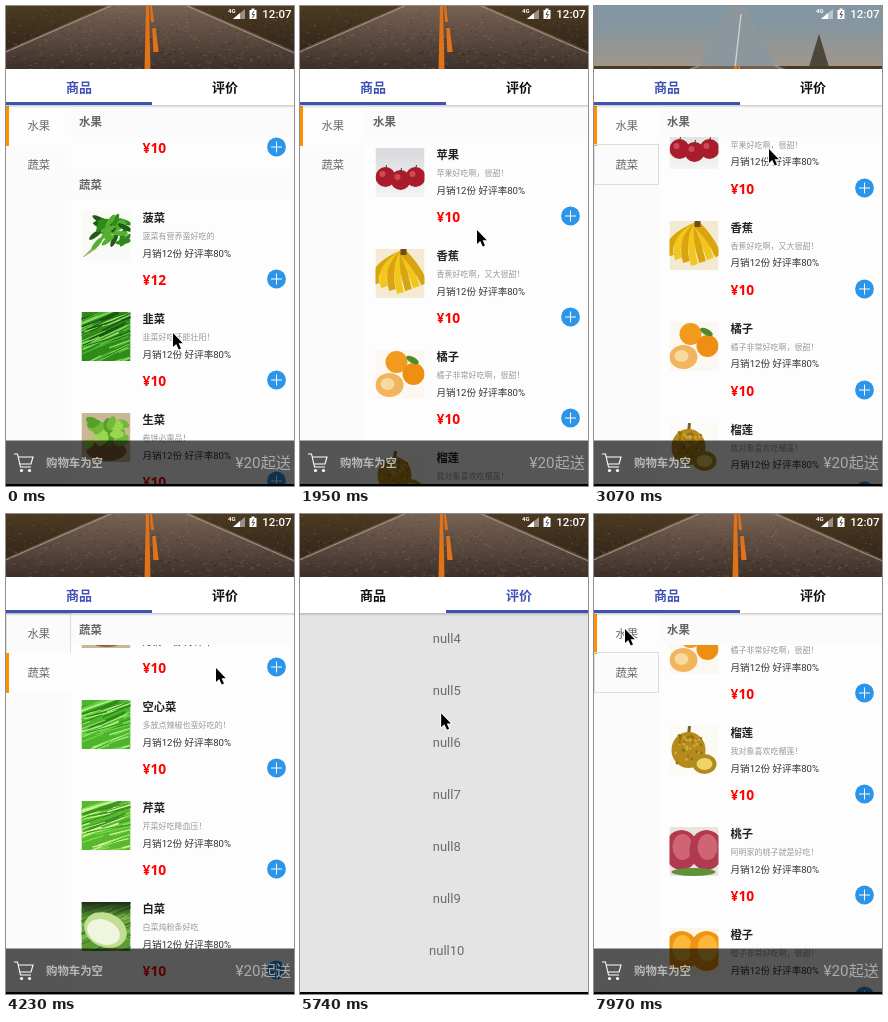
An HTML page with a canvas that plays this animation: 288 by 480 pixels, repeating every 8 s.

```html
<!DOCTYPE html>
<html lang="zh">
<head>
<meta charset="utf-8">
<style>
html, body { margin: 0; width: 100%; height: 100%; overflow: hidden; background: #000; }
canvas { display: block; }
</style>
</head>
<body>
<canvas id="stage" width="288" height="480"></canvas>
<script>
const c = document.getElementById('stage').getContext('2d');
const CJK = '"Noto Sans CJK SC", "Noto Sans CJK", sans-serif';
const LOOP = 8000, PAGE = 292, ROW = 101, HEAD = 31, TOP = 100, BOTTOM = 478;
const BLUE = '#3f51b5';

// Key points [time, value, ...], eased in between
const SCROLL = [[30, 574], [800, 215], [860, 215], [1500, 0], [2940, 0], [3070, 28], [4170, 896]];
const EXPAND = [[1960, 0], [2470, 130], [2560, 130], [2930, 0]];
const SWIPE = [[4230, 292], [5205, 0], [6490, 0], [7012, 292]];
const REVIEWS = [[5230, 0], [5860, 230], [5920, 230], [6300, 0]];
const CURSOR = [[0, 167, 327], [800, 170, 400], [1400, 177, 224], [1950, 177, 224], [2470, 176, 310],
  [3070, 175, 143], [3400, 195, 320], [4230, 210, 154], [5170, 38, 190], [5860, 150, 200],
  [6490, 227, 206], [6700, 270, 206], [7560, 31, 115]];

function at(keys, t) {
  const i = keys.findIndex(k => k[0] > t);
  if (i <= 0) return keys.at(i).slice(1);
  const a = keys[i - 1], b = keys[i], u = (t - a[0]) / (b[0] - a[0]);
  return a.slice(1).map((v, n) => v + (b[n + 1] - v) * u * u * (3 - 2 * u));
}

function rand(n) {
  const v = Math.sin(n * 12.9898) * 43758.5453;
  return v - Math.floor(v);
}

function box(color, x, y, w, h) {
  c.fillStyle = color;
  c.fillRect(x, y, w, h);
}

function oval(color, x, y, rx, ry = rx, turn = 0) {
  c.fillStyle = color;
  c.beginPath();
  c.ellipse(x, y, rx, ry, turn, 0, 7);
  c.fill();
}

function trace(p) {
  c.beginPath();
  for (let i = 0; i < p.length; i += 2) c.lineTo(p[i], p[i + 1]);
}

function poly(color, ...p) {
  trace(p);
  c.fillStyle = color;
  c.fill();
}

function line(color, width, ...p) {
  trace(p);
  c.strokeStyle = color;
  c.lineWidth = width;
  c.stroke();
}

function text(s, x, y, size, color, weight = 400, align = 'left', face = 'Roboto') {
  c.font = `${weight} ${size}px "${face}", ${CJK}`;
  c.fillStyle = color;
  c.textAlign = align;
  c.fillText(s, x, y);
}

function fade(y0, y1, ...colors) {
  const g = c.createLinearGradient(0, y0, 0, y1);
  colors.forEach((k, i) => g.addColorStop(i / (colors.length - 1), k));
  return g;
}

function clipped(x, y, w, h, draw) {
  c.save();
  c.beginPath();
  c.rect(x, y, w, h);
  c.clip();
  draw();
  c.restore();
}

// Pictures, each 49 by 49
const paper = color => box(color, 0, 0, 49, 49);

function stalks(back, colors, tilt) {
  paper(back);
  for (let i = 0; i < 60; i++) {
    const x = rand(i + 1) * 70 - 10, y = rand(i + 60) * 52;
    line(colors[i % colors.length], 0.8 + rand(i + 9), x - 18, y + tilt, x + 18, y - tilt + rand(i) * 10);
  }
}

function leaves(colors, count, x, y, w, h, rx, ry) {
  for (let i = 0; i < count; i++)
    oval(colors[i % colors.length], x + rand(i + 1) * w, y + rand(i + 40) * h, rx, ry, rand(i + 7) * 2 - 1.5);
}

function pair(back, dark, light) {
  paper(back);
  for (const x of [12, 37]) {
    oval(dark, x, 23, 17, 20);
    oval(light, x + 1, 20, 10, 13);
  }
}

function apples() {
  paper(fade(0, 49, '#d8d9dc', '#f4f4f5'));
  for (let i = 0; i < 3; i++) {
    const x = 10 + i * 15, y = 29 + i % 2 * 3;
    oval('#a81c2c', x, y, 10);
    oval('#cf4a55', x - 3, y - 3, 3);
    line('#5a3a22', 1, x, y - 7, x + 1, y - 12);
  }
}

function bananas() {
  paper('#f3ead2');
  for (let i = 0; i < 7; i++) {
    c.lineWidth = 7;
    c.strokeStyle = i % 2 ? '#f2c61c' : '#d9a40f';
    c.beginPath();
    c.moveTo(28, 4);
    c.quadraticCurveTo(i * 8 - 6, 18, i * 8 + 1, 44 - Math.abs(i - 3) * 3);
    c.stroke();
  }
  box('#6b4e1c', 25, 0, 6, 6);
}

function tangerines() {
  paper('#fbf8f2');
  oval('#f29a1e', 21, 12, 11);
  oval('#ee8f14', 38, 24, 11);
  oval('#f2b45c', 14, 35, 14, 12);
  oval('#f8d9a0', 12, 34, 7, 6);
  oval('#4f8a2a', 37, 10, 7, 3, 0.5);
}

function durian() {
  paper('#fbfaf5');
  line('#7a6428', 3, 20, 0, 19, 10);
  oval('#b58a1c', 19, 24, 17, 18);
  leaves(['#d0aa38', '#94700f'], 40, 6, 9, 26, 30, 1.4, 1.4);
  oval('#b08a20', 35, 38, 12, 10);
  oval('#eed465', 35, 38, 8, 6);
}

function peaches() {
  pair('#e9e4e0', '#b23a50', '#cf6472');
  oval('#5f9238', 24, 45, 22, 4);
}

function spinach() {
  paper('#f8faf5');
  for (let i = 0; i < 24; i++) line('#a3b06a', 1, 2 + rand(i) * 12, 46 - rand(i) * 8, 24, 24);
  leaves(['#2f8a1c', '#55b030', '#1f5a16'], 30, 14, 8, 30, 26, 8, 2.5);
}

function lettuce() {
  paper('#c9b795');
  oval('#8a6238', 25, 38, 20, 10);
  leaves(['#74b838', '#9ad650', '#55a028'], 24, 6, 8, 36, 24, 7, 4);
}

function cabbage() {
  stalks('#5d9c34', ['#86bf4c', '#3f7f26'], 9);
  paper(fade(0, 16, '#1c2a18', 'rgba(28,42,24,0)'));
  oval('#c2de92', 24, 28, 22, 17, 0.4);
  oval('#f0f5e0', 22, 30, 17, 12, 0.4);
}

const oranges = () => pair('#fdf6e8', '#ef9410', '#fbb83c');
const leek = () => stalks('#2f8a1c', ['#57c03a', '#1a5512', '#8ae05e'], 10);
const greens = () => stalks('#4db52c', ['#74d94c', '#2c8a1a', '#b0f088'], 9);
const celery = () => stalks('#58b82e', ['#84e050', '#3a921c', '#d0f8a0'], 8);

const SECTIONS = [
  { name: '水果', y: 0, items: [
    ['苹果', '苹果好吃啊，很甜！', apples],
    ['香蕉', '香蕉好吃啊，又大很甜！', bananas],
    ['橘子', '橘子非常好吃啊，很甜！', tangerines],
    ['榴莲', '我对象喜欢吃榴莲！', durian],
    ['桃子', '阿明家的桃子就是好吃！', peaches],
    ['橙子', '橙子非常好吃啊，很甜！', oranges]] },
  { name: '蔬菜', y: HEAD + 6 * ROW, items: [
    ['菠菜', '菠菜有营养蛮好吃的', spinach, 12],
    ['韭菜', '韭菜好吃还能壮阳！', leek],
    ['生菜', '卷饼必需品！', lettuce],
    ['空心菜', '多放点辣椒也蛮好吃的！', greens],
    ['芹菜', '芹菜好吃降血压！', celery],
    ['白菜', '白菜炖粉条好吃', cabbage]] }
];

function header(name, y) {
  box('#fbfbfb', 65, y, 227, HEAD);
  text(name, 73, y + 19.5, 11.4, '#666', 700);
}

function item([name, note, picture, price = 10], y) {
  c.save();
  c.translate(75.5, y + 11);
  clipped(0, 0, 49, 49, picture);
  c.restore();
  text(name, 136.5, y + 22, 11.3, '#222', 700);
  text(note, 136.5, y + 39, 8, '#999');
  text('月销12份 好评率80%', 136.5, y + 56.5, 9.6, '#333');
  text('¥' + price, 136.5, y + 85, 13.8, '#f00', 700, 'left', 'Noto Sans');
  oval('#2b95e9', 270.5, y + 79, 9.4);
  line('#fff', 1, 265, y + 79, 276, y + 79);
  line('#fff', 1, 270.5, y + 73.5, 270.5, y + 84.5);
}

function goods(t, scroll) {
  const now = scroll >= SECTIONS[1].y ? 1 : 0;
  box('#fdfdfd', 0, TOP - 1, PAGE, BOTTOM);
  box('#fbfbfb', 0, TOP - 1, 65, BOTTOM);
  SECTIONS.forEach((s, i) => {
    const y = TOP + i * 39;
    if (i === now) {
      box('#fdfdfd', 0, y, 65, 40);
      box('#ff9100', 0, y, 3, 40);
    } else if (t > 2000) {
      c.strokeStyle = '#ddd';
      c.lineWidth = 1;
      c.strokeRect(0.5, y - 0.5, 64, 40);
    }
    text(s.name, 21.5, y + 23.5, 11.3, '#666');
  });
  clipped(65, TOP, 227, BOTTOM - TOP, () => {
    for (const s of SECTIONS) {
      const y = TOP + s.y - scroll;
      header(s.name, y);
      s.items.forEach((it, i) => {
        const top = y + HEAD + i * ROW;
        if (top > -ROW && top < BOTTOM) item(it, top);
      });
    }
    const push = now ? 0 : Math.min(0, SECTIONS[1].y - scroll - HEAD);
    header(SECTIONS[now].name, TOP + push);
  });
}

function reviews(scroll) {
  clipped(0, TOP - 1, PAGE, BOTTOM, () => {
    box('#e4e4e4', 0, 0, PAGE, 2 * BOTTOM);
    for (let i = 0; i < 20; i++) text('null' + i, 146.7, 129.7 + i * 52 - scroll, 13, '#6c6c6c', 400, 'center');
  });
}

// A strip in perspective: centre and half width at its top and bottom
function strip(color, y0, x0, w0, y1, x1, w1) {
  poly(color, x0 - w0, y0, x0 + w0, y0, x1 + w1, y1, x1 - w1, y1);
}

function road() {
  box(fade(-130, 4, '#5f8caf', '#7f98a8', '#8596a0', '#a3968a'), 0, -130, 288, 134);
  strip('#8b979c', -60, 143, 8, 4, 143, 40);
  strip('#cdd0cd', -52, 147, 0.7, 2, 141, 0.7);
  strip('#4d463a', -32, 225, 0, 4, 225, 11);
  box(fade(0, 63, '#4c3a22', '#3a2c1c', '#2c2018'), 0, 0, 288, 64);
  strip(fade(0, 63, '#776252', '#5c4a3f', '#3d302a'), 0, 143, 42, 64, 143, 190);
  for (const side of [-1, 1]) line('#a08f7e', 1.2, 143 + side * 38, 0, 143 + side * 150, 49);
  // Gravel gets coarser towards the viewer
  for (let i = 0; i < 500; i++) {
    const y = rand(i + 1) * 63;
    box(i % 2 ? 'rgba(255,230,200,.13)' : 'rgba(0,0,0,.2)', rand(i + 700) * 288, y, 1 + y / 30, 1);
  }
  strip('#e0731a', 0, 141.5, 1.5, 64, 141.5, 3);
  strip('#e0731a', 0, 145, 1, 16, 146.5, 1.5);
  strip('#e0731a', 22, 148, 1.7, 46, 150, 2.7);
}

function status() {
  text('4G', 222, 7, 6, '#fff', 700);
  poly('rgba(255,255,255,.45)', 239, 3, 239, 13, 227, 13);
  poly('#fff', 234, 7, 234, 13, 227, 13);
  box('#fff', 243.5, 4, 7, 9);
  box('#fff', 245.5, 2.5, 3, 2);
  line('#555', 1, 248, 5, 246, 8.5, 248.5, 8.5, 246.5, 12);
  text('12:07', 285.5, 12.3, 11.5, '#fff', 500, 'right');
}

function tabs(off) {
  const second = off < PAGE / 2;
  box('#fff', 0, 63, 288, 36);
  text('商品', 73, 86, 13, second ? '#111' : BLUE, 700, 'center');
  text('评价', 219, 86, 13, second ? BLUE : '#111', 700, 'center');
  box(BLUE, Math.floor(146 * (1 - off / PAGE)), 96, 146, 3);
  box(fade(99, 102, 'rgba(0,0,0,.2)', 'rgba(0,0,0,0)'), 0, 99, 288, 3);
}

function cartBar() {
  box('rgba(0,0,0,.66)', 0, 434.5, 288, 44);
  line('#fff', 1.1, 8, 448, 11.5, 448, 14.5, 461, 25, 461);
  line('#fff', 1.1, 12.2, 451, 27, 451, 25, 458, 14, 458);
  for (const x of [15.5, 23.5]) oval('#fff', x, 464.5, 1.6);
  text('购物车为空', 40, 460.5, 11.4, '#b8b8b8', 700);
  text('¥20起送', 285, 462, 15.2, '#aaa', 400, 'right');
}

function cursor(x, y) {
  c.save();
  c.translate(x, y);
  c.lineJoin = 'round';
  const arrow = [0, 0, 0, 14, 3.2, 11, 5.8, 16.5, 8, 15.5, 5.6, 10.2, 9.8, 10.2];
  line('#fff', 2, ...arrow, 0, 0);
  poly('#000', ...arrow);
  c.restore();
}

function frame() {
  const t = performance.now() % LOOP;
  const scroll = t < 7770 ? at(SCROLL, t)[0] : 233;
  const [grow] = at(EXPAND, t), [off] = at(SWIPE, t);
  // The picture lags behind the collapsing bar, then snaps back
  const shift = t > 2600 && t < 3400 ? Math.max(grow, 60) : grow;

  box('#000', 0, 0, 288, 480);
  clipped(0, 0, 288, BOTTOM, () => {
    clipped(0, 0, 288, 63 + grow, () => {
      c.translate(0, shift);
      road();
    });
    status();
    c.save();
    c.translate(0, grow);
    c.save();
    c.translate(off - PAGE, 0);
    if (off > 0) goods(t, scroll);
    c.translate(PAGE, 0);
    if (off < PAGE) reviews(at(REVIEWS, t)[0]);
    c.restore();
    tabs(off);
    c.restore();
    if (off > PAGE / 2) cartBar();
    cursor(...at(CURSOR, t));
  });
  requestAnimationFrame(frame);
}
frame();
</script>
</body>
</html>
```
